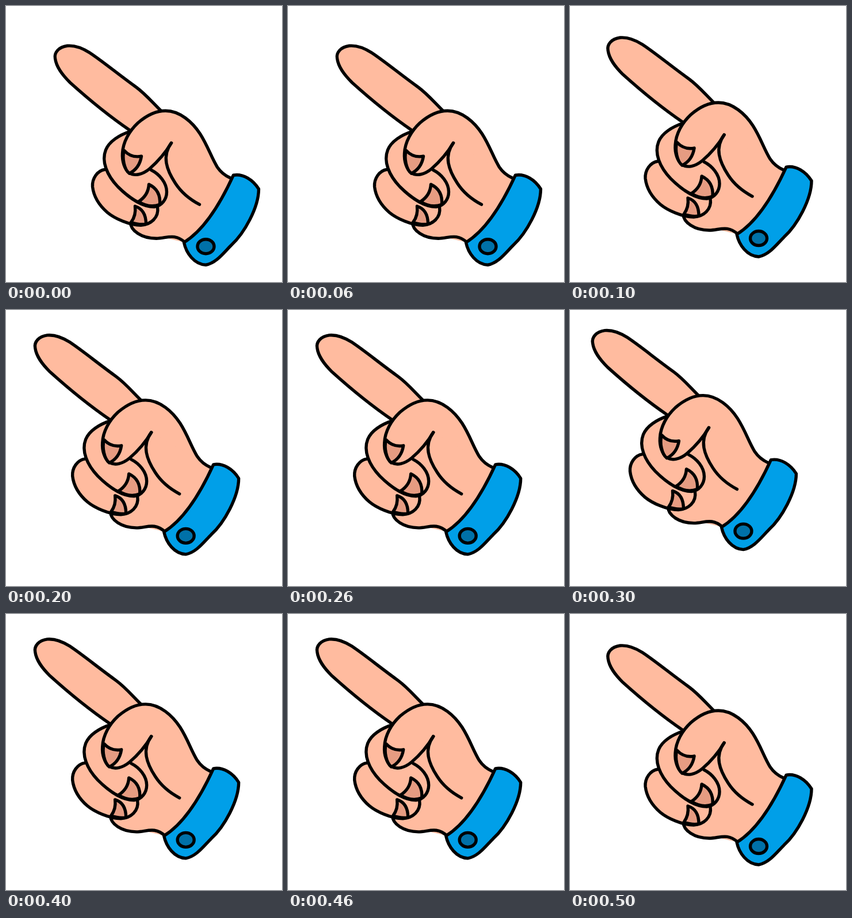
An HTML page for the animation above (600 ms loop, 480 px wide and 480 px high).

```html
<!DOCTYPE html>
<html>
<head>
<meta charset="utf-8">
<title>Pointing hand</title>
<style>
html, body { margin: 0; height: 100%; overflow: hidden; background: #fff; }
svg { display: block; width: 100%; height: 100%; }
#hand { fill: #ffbb9f; stroke: #000; stroke-width: 5.4; stroke-linecap: round; stroke-linejoin: round; }
.palm { stroke: none; }
.crease { fill: none; }
.nail { fill: #e69c82; }
.cuff { fill: #009fe8; }
.button { fill: #0071a8; }
</style>
</head>
<body>
<svg viewBox="0 0 480 480">
  <g id="hand">
    <!-- index finger -->
    <path d="M250,168 C232,150 222,138 207,127 C175,104 150,83 126,67 C112,58 99,54 87,55 C72,57 64,67 66,77 C68,92 78,105 92,119 C122,146 158,176 196,202"/>
    <path class="palm" d="M197,362 L245,386 L292,397 L345,370 L371,285 L335,257 L290,210 L230,220Z"/>
    <!-- little, ring and middle finger -->
    <path d="M197,362 C197,376 216,390 242,390 C260,390 273,380 292,397"/>
    <path d="M153,270 C139,272 130,286 131,300 C133,317 142,332 157,345 C169,355 195,367 215,367 C232,366 247,354 244,335"/>
    <path d="M196,204 C178,210 160,221 154,236 C146,256 156,280 175,300 C192,317 216,335 238,335 C251,334 260,322 260,309 C260,293 247,278 233,271"/>
    <!-- thumb and back of the hand -->
    <path d="M268,224 C258,241 245,256 230,269 C218,279 204,282 195,276 C187,270 182,256 183,242 C184,222 195,203 210,189 C225,176 242,168 258,168 C283,168 305,188 318,208 C332,230 337,248 348,266 C354,275 362,281 371,285"/>
    <path class="crease" d="M268,224 C251,247 260,271 275,294 C286,311 300,322 317,331"/>
    <path class="nail" d="M186,237 C194,246 205,249 216,247 C214,260 207,271 195,277 C186,270 182,250 186,237Z"/>
    <path class="nail" d="M211,326 Q228,315 229,296 Q250,306 248,331 Q230,338 211,326Z"/>
    <path class="nail" d="M198,362 Q207,350 205,334 C218,338 224,349 224,365 Q212,367 198,362Z"/>
    <path class="cuff" d="M376,280 C393,277 410,288 420,304 C420,336 395,381 372,402 C359,415 346,433 328,436 C308,435 294,416 290,397 C326,375 355,326 376,280Z"/>
    <ellipse class="button" cx="328" cy="404" rx="14.5" ry="12.5"/>
  </g>
</svg>
<script>
const hand = document.getElementById('hand');
const HOLD = 100, STEPS = 6;

// Held steps out to the far pose and back, slowing towards the far end.
function draw() {
  const step = Math.floor(performance.now() / HOLD) % STEPS;
  const k = 3 - Math.abs(3 - step);
  const slide = 19.5 - k * (21.5 - 2.05 * k);
  hand.setAttribute('transform', `translate(${slide} ${0.73 * slide})`);
  requestAnimationFrame(draw);
}
draw();
</script>
</body>
</html>
```
